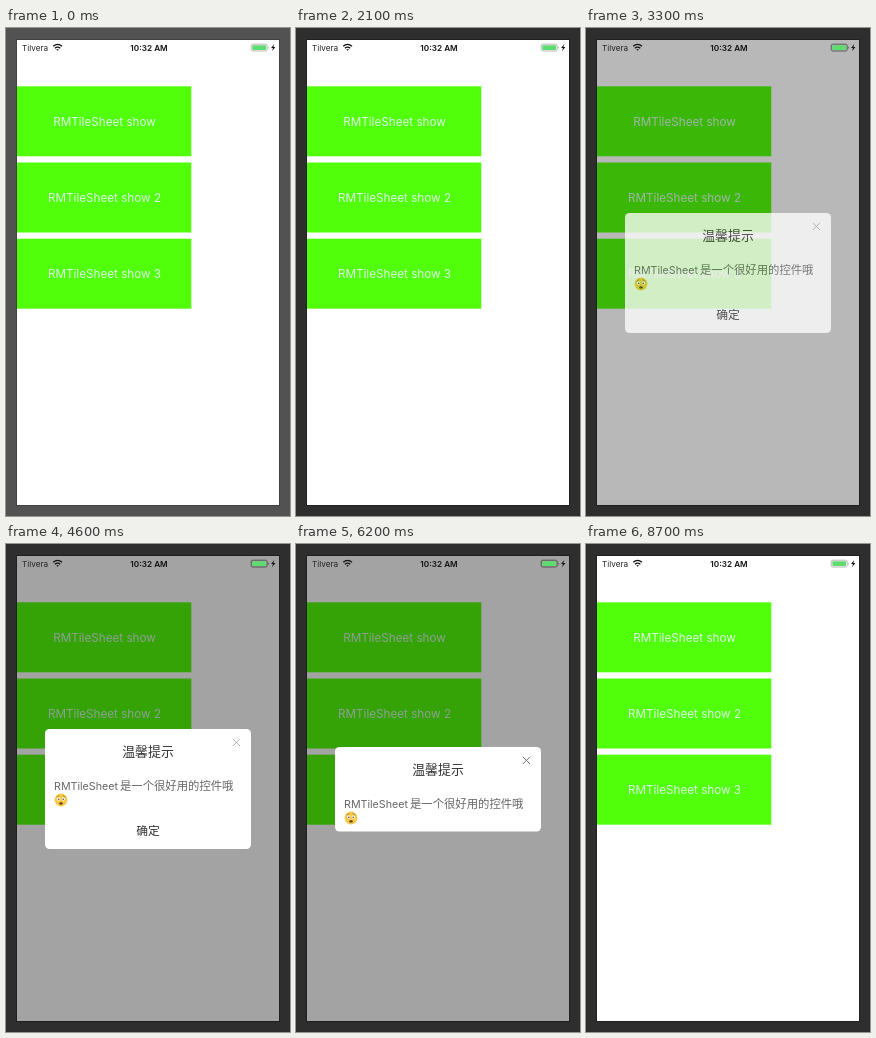
These frames come from a looping animation (284x488 px, 8800 ms). An HTML page:

```html
<!DOCTYPE html>
<html lang="zh-CN">
<head>
<meta charset="utf-8">
<title>Alert demo</title>
<style>
html, body { margin: 0; width: 100%; height: 100%; overflow: hidden; }
svg { display: block; width: 284px; height: 488px; }
text { font-family: Inter, "Noto Sans CJK SC", "Noto Sans CJK", sans-serif; }
.mid { text-anchor: middle; }
</style>
</head>
<body>
<svg viewBox="0 0 284 488">
  <rect id="bezel" width="284" height="488"/>
  <rect id="rim" x="10" y="11" width="264" height="467"/>
  <rect x="11" y="12" width="262" height="465" fill="#fff"/>
  <g id="buttons"></g>
  <rect id="dim" x="11" y="12" width="262" height="465" opacity="0"/>

  <g id="status">
    <text x="16" y="22.6" font-size="8.2" fill="#222">Tilvera</text>
    <g fill="none" stroke="#111" stroke-width="1.3">
      <path d="M47.2 18.3Q51.6 14.6 56 18.3M48.9 20.2Q51.6 17.9 54.3 20.2"/>
      <path d="M50.2 21.2h2.8l-1.4 1.5z" fill="#111" stroke="none"/>
    </g>
    <text class="mid" x="143" y="22.6" font-size="8.2" font-weight="600" fill="#111">10:32 AM</text>
    <rect id="cell" x="245.2" y="16.2" width="16" height="6.8" rx="1.7" fill="none" stroke-width=".7"/>
    <rect x="246.3" y="17.3" width="13.8" height="4.6" rx=".8" fill="#5fdc70"/>
    <path id="nub" d="M262.2 18.4q1.5 1.2 0 2.4z"/>
    <path d="M268.3 16l-3.2 4h1.9l-1 3.3 3.4-4.2h-2z" fill="#111"/>
  </g>

  <g id="alert" opacity="0">
    <rect id="card" x="39" y="185" width="206" height="120" rx="4.5" fill="#fff"/>
    <g id="content">
      <path id="close" d="M226.8 194.8l7.2 7.2m0-7.2l-7.2 7.2" fill="none" stroke-width=".9"/>
      <text class="mid" x="142" y="211.8" font-size="12.9" fill="#333">温馨提示</text>
      <g fill="#666">
        <text x="48" y="245.8" font-size="10.7">RMTileSheet</text>
        <text x="114" y="245.8" font-size="11.35">是一个很好用的控件哦</text>
      </g>
      <g transform="translate(55 256)">
        <circle r="6.4" fill="#f9c846"/>
        <g fill="#fff">
          <circle cx="-2.4" cy="-1" r="1.7"/>
          <circle cx="2.4" cy="-1" r="1.7"/>
        </g>
        <g fill="#5b3a1c">
          <circle cx="-2.2" cy="-.8" r=".8"/>
          <circle cx="2.2" cy="-.8" r=".8"/>
          <ellipse cy="3.4" rx="1.7" ry="1.2"/>
        </g>
        <path d="M-4.3-2.9l2.6-1.4m3.4 0l2.6 1.4" fill="none" stroke="#8a5a20" stroke-width=".7"/>
      </g>
    </g>
    <g class="mid" font-size="11.8">
      <text id="cancel" x="90" y="291.4" fill="#333">取消</text>
      <text id="ok" y="291.4">确定</text>
    </g>
  </g>
</svg>
<script>
const LOOP = 8800, TICK = 100, FADE = 320;
// Each alert fades in from `start` and is gone at `end`.
const ALERTS = [
  { start: 300, end: 1800, actions: 2 },
  { start: 3100, end: 4700, actions: 1 },
  { start: 5900, end: 8200, actions: 0 }
];
const $ = id => document.getElementById(id);
const set = (id, attrs) => {
  for (const key in attrs) $(id).setAttribute(key, attrs[key]);
};

$('buttons').innerHTML = ['', ' 2', ' 3'].map((suffix, i) => {
  const y = 58.3 + i * 76.2;
  return `<rect x="11" y="${y}" width="174.3" height="70" fill="#52ff0a"/>
    <text class="mid" x="98.5" y="${y + 39.4}" font-size="11.7" fill="#dcf8e8">RMTileSheet show${suffix}</text>`;
}).join('');

function showAlert({ actions }) {
  const shift = actions ? 0 : 18;
  set('card', { y: 185 + shift, height: actions ? 120 : 84.5 });
  set('content', { transform: `translate(0 ${shift})` });
  set('close', { stroke: actions ? '#aaa' : '#666' });
  set('cancel', { visibility: actions === 2 ? 'visible' : 'hidden' });
  set('ok', {
    visibility: actions ? 'visible' : 'hidden',
    x: actions === 2 ? 193 : 142,
    fill: actions === 2 ? '#eeb044' : '#333'
  });
}

function draw(now) {
  const t = Math.floor(now % LOOP / TICK) * TICK;
  const active = t >= 100;
  set('bezel', { fill: active ? '#2e2e2e' : '#535252' });
  set('rim', { fill: active ? '#202020' : '#434242' });

  const alert = ALERTS.find(a => t >= a.start && t < a.end);
  let level = 0;
  if (alert) {
    const p = Math.min(1, (t - alert.start + 20) / FADE);
    level = p * p * (3 - 2 * p);
    showAlert(alert);
  }
  set('dim', { opacity: level * 0.36 });
  set('alert', { opacity: level });
  const outline = level > 0.5 ? '#333' : '#999';
  set('cell', { stroke: outline });
  set('nub', { fill: outline });
}

const began = performance.now();
function loop() {
  draw(performance.now() - began);
  requestAnimationFrame(loop);
}
loop();
</script>
</body>
</html>
```
